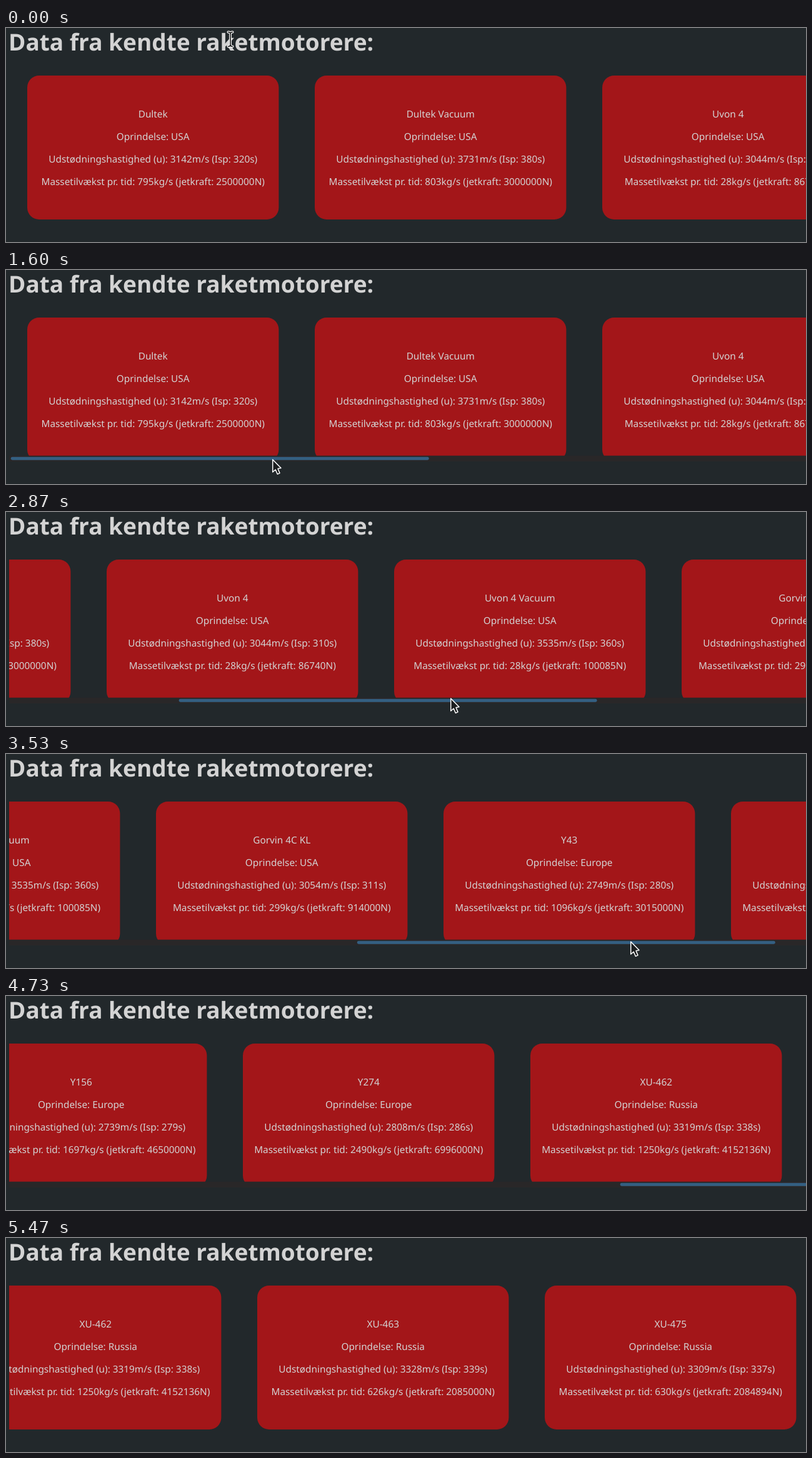
Recreate the animation shown at these times as an HTML page with a canvas. Size 1280x342 px, loop 6740 ms.

```html
<!DOCTYPE html>
<html lang="da">
<head>
<meta charset="utf-8">
<title>Raketmotorer</title>
<style>
  html, body { margin: 0; width: 100%; height: 100%; overflow: hidden; background: #22282b; }
  canvas { display: block; }
</style>
</head>
<body>
<canvas id="stage" width="1280" height="342"></canvas>
<script>
const ctx = document.getElementById('stage').getContext('2d');
const LOOP = 6740, FPS = 15;
const COLOR = { page: '#22282b', card: '#a31619', text: '#d3d3d3', thumb: '#345f82', track: '#292728' };
const CARD = { x: 34, y: 76, w: 402.4, h: 230, pitch: 460, radius: 19 };
const VIEW_LEFT = 5, SCROLL_RATIO = 2.949;

// name, country, exhaust speed, specific impulse, mass flow, thrust
const engines = [
  ['Dultek', 'USA', 3142, 320, 795, 2500000],
  ['Dultek Vacuum', 'USA', 3731, 380, 803, 3000000],
  ['Uvon 4', 'USA', 3044, 310, 28, 86740],
  ['Uvon 4 Vacuum', 'USA', 3535, 360, 28, 100085],
  ['Gorvin 4C KL', 'USA', 3054, 311, 299, 914000],
  ['Y43', 'Europe', 2749, 280, 1096, 3015000],
  ['Y156', 'Europe', 2739, 279, 1697, 4650000],
  ['Y274', 'Europe', 2808, 286, 2490, 6996000],
  ['XU-462', 'Russia', 3319, 338, 1250, 4152136],
  ['XU-463', 'Russia', 3328, 339, 626, 2085000],
  ['XU-475', 'Russia', 3309, 337, 630, 2084894],
];

// Keys are [step, value...], with 15 steps per second.
const pointerKeys = [
  [2, 359, 18], [11, 385, 215], [12, 385, 215], [17, 438, 318], [23, 426, 302], [29, 426, 302],
  [43, 711, 297], [53, 999, 299], [62, 1167, 307], [71, 1424, 311],
];
const scrollKeys = [[29, 0], [43, 793], [53, 1634], [62, 2125], [71, 2875], [81, 3772]];

// Smooth monotone interpolation through the keys.
function sample(keys, step, column) {
  const last = keys.length - 1;
  if (step <= keys[0][0]) return keys[0][column];
  if (step >= keys[last][0]) return keys[last][column];
  const slope = i => (keys[i + 1][column] - keys[i][column]) / (keys[i + 1][0] - keys[i][0]);
  const tangent = i => {
    if (i === 0) return 0;
    if (i === last) return slope(i - 1);
    const a = slope(i - 1), b = slope(i);
    return a * b <= 0 ? 0 : 2 * a * b / (a + b);
  };
  const i = keys.findIndex(key => key[0] > step) - 1;
  const span = keys[i + 1][0] - keys[i][0];
  const u = (step - keys[i][0]) / span, v = 1 - u;
  return keys[i][column] * (1 + 2 * u) * v * v + keys[i + 1][column] * (3 - 2 * u) * u * u
    + span * (tangent(i) * u * v * v - tangent(i + 1) * u * u * v);
}

function roundRect(x, y, w, h, radius, color) {
  ctx.fillStyle = color;
  ctx.beginPath();
  ctx.roundRect(x, y, w, h, radius);
  ctx.fill();
}

function drawCard([name, country, speed, isp, flow, thrust], x) {
  roundRect(x, CARD.y, CARD.w, CARD.h, CARD.radius, COLOR.card);
  ctx.fillStyle = COLOR.text;
  [
    name,
    `Oprindelse: ${country}`,
    `Udstødningshastighed (u): ${speed}m/s (Isp: ${isp}s)`,
    `Massetilvækst pr. tid: ${flow}kg/s (jetkraft: ${thrust}N)`,
  ].forEach((line, i) => ctx.fillText(line, x + CARD.w / 2, 143 + 36 * i));
}

function drawCards(scroll) {
  ctx.save();
  ctx.beginPath();
  ctx.rect(VIEW_LEFT, 0, 1280, 342);
  ctx.clip();
  ctx.font = '15.333px "Noto Sans", sans-serif';
  ctx.textAlign = 'center';
  engines.forEach((engine, i) => {
    const x = CARD.x + i * CARD.pitch - scroll;
    if (x < 1280 && x + CARD.w > 0) drawCard(engine, x);
  });
  ctx.restore();
}

function drawScrollbar(step, scroll) {
  if (step < 6 || step >= 82) return;
  const x = 7.7 + scroll / SCROLL_RATIO;
  if (step < 24) {
    roundRect(x, 302.5, 669, 2.5, 1.2, COLOR.thumb);
  } else {
    ctx.fillStyle = COLOR.track;
    ctx.fillRect(VIEW_LEFT, 296.7, 1280, 9.3);
    roundRect(x, 298.8, 669, 4.9, 2.4, COLOR.thumb);
  }
}

const arrow = new Path2D('M.7 1V21L5.2 17 8.3 24.2 12 22.6 9 15.5 14 14.5Z');
const beam = new Path2D('M-3.5-11.5Q0-11.5 0-9V9Q0 11.5-3.5 11.5M3.5-11.5Q0-11.5 0-9M0 9Q0 11.5 3.5 11.5');

function drawPointer(x, y) {
  ctx.save();
  ctx.translate(x, y);
  ctx.lineJoin = ctx.lineCap = 'round';
  ctx.strokeStyle = '#fff';
  if (y < 48) {
    ctx.lineWidth = 4;
    ctx.stroke(beam);
    ctx.strokeStyle = '#111';
    ctx.lineWidth = 1.6;
    ctx.stroke(beam);
  } else {
    ctx.fillStyle = '#1b1d1e';
    ctx.fill(arrow);
    ctx.lineWidth = 1.5;
    ctx.stroke(arrow);
  }
  ctx.restore();
}

function draw() {
  const time = performance.now() % LOOP;
  const step = Math.floor((time + 4) * FPS / 1000);
  const scroll = sample(scrollKeys, step, 1);

  ctx.fillStyle = COLOR.page;
  ctx.fillRect(0, 0, 1280, 342);
  ctx.fillStyle = COLOR.text;
  ctx.font = 'bold 37px "Noto Sans", sans-serif';
  ctx.textRendering = 'geometricPrecision';
  ctx.fillText('Data fra kendte raketmotorere:', 4, 36);
  drawCards(scroll);
  drawScrollbar(step, scroll);
  drawPointer(sample(pointerKeys, step, 1), sample(pointerKeys, step, 2));
  requestAnimationFrame(draw);
}
draw();
</script>
</body>
</html>
```
